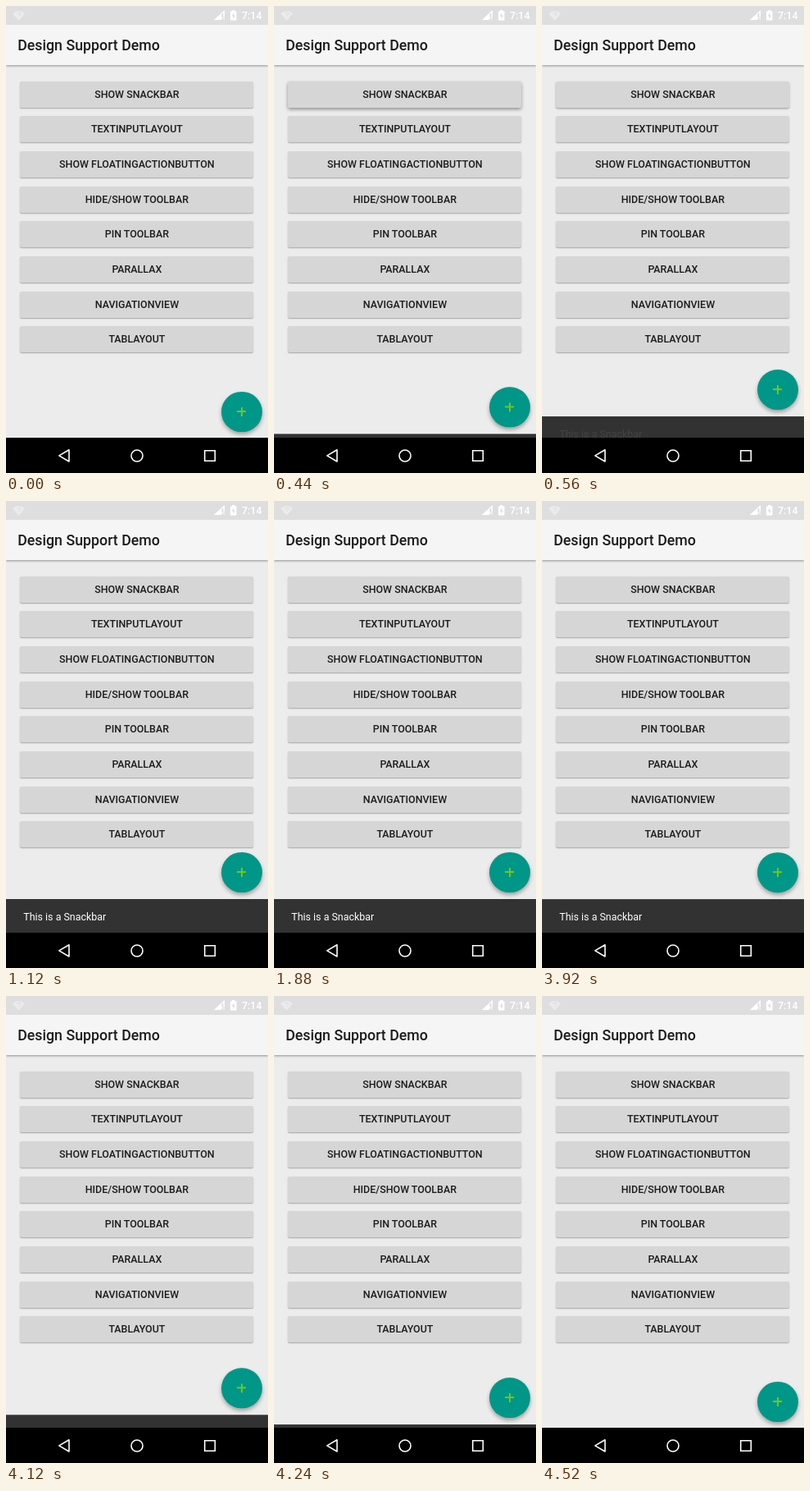
Write an HTML page that moves like this. It is 320 px wide and 569 px high and loops after 5240 ms.

```html
<!DOCTYPE html>
<html lang="en">
<head>
<meta charset="utf-8">
<title>Design Support Demo</title>
<style>
html, body { margin: 0; width: 100%; height: 100%; overflow: hidden; }
body { position: relative; background: #ececec; font: 500 12.44px Roboto, sans-serif; color: #1c1c1c; }
body > * { position: absolute; box-sizing: border-box; }
#status { left: 0; top: 0; width: 320px; height: 23px; background: #dedede; }
#clock { left: 288px; top: 0; line-height: 23px; color: #fff; }
#bar { left: 0; top: 23px; width: 320px; height: 49px; padding-left: 14.2px; background: #f5f5f5;
  box-shadow: 0 1px 2.5px rgba(0,0,0,.4); clip-path: inset(0 0 -8px 0); font-size: 17.78px; line-height: 50px; }
.btn { left: 17.3px; width: 285.2px; height: 32.2px; border-radius: 2px; background: #d6d6d6;
  text-align: center; line-height: 32.4px; box-shadow: 0 1px 1.5px rgba(0,0,0,.3); }
#fab { left: 263.1px; top: 469.5px; width: 49.8px; height: 49.8px; border-radius: 50%; background: #009688;
  box-shadow: 0 3px 5px rgba(0,0,0,.32); }
#fab::before, #fab::after { content: ""; position: absolute; background: #74c80c; }
#fab::before { left: 19.4px; top: 23.9px; width: 11px; height: 2px; }
#fab::after { left: 23.9px; top: 19.4px; width: 2px; height: 11px; }
#snack { left: 0; top: 484.5px; width: 320px; height: 42px; padding-left: 21.3px; background: #323232;
  color: #fff; font-weight: 400; line-height: 43px; }
#nav { left: 0; top: 526.4px; width: 320px; height: 43px; background: #000; }
svg { left: 0; top: 0; }
</style>
</head>
<body>
<div id="status"></div>
<div id="bar">Design Support Demo</div>
<div id="fab"></div>
<div id="snack"><span id="msg">This is a Snackbar</span></div>
<div id="nav"></div>
<div id="clock">7:14</div>
<svg width="320" height="569" fill="none">
  <path d="M8 9Q15.5 3 23 9L15.5 18Z" fill="#ebebeb"/>
  <path d="M14 10q0-2 1.8-2t1.8 1.8q0 1-1.8 2.2v1" stroke="#dedede"/>
  <path d="M254 17L267 5V17Z" fill="#f0f0f0"/>
  <path d="M262 17L267 12.4V5L254 17Z" fill="#fff"/>
  <path d="M264.5 9V14M264.5 15V17" stroke="#dedede" stroke-width="2"/>
  <path d="M274 6.5H276V5H279.5V6.5H281.5V17.5H274Z" fill="#fff"/>
  <path d="M278.5 8L275.7 12.6H277.5V16L280 11.4H278.3Z" fill="#dedede"/>
  <g stroke="#fff" stroke-width="1.6">
    <path d="M77 540.8V555L64.8 547.9Z" stroke-linejoin="round"/>
    <circle cx="160" cy="548" r="7"/>
    <path d="M242.7 541.7H255.3V554.3H242.7Z"/>
  </g>
</svg>
<script>
const LOOP = 5240, SLIDE = 560, SHOW = 328, HIDE = 3899, TRAVEL = 42;
const $ = id => document.getElementById(id);
const fab = $('fab'), snack = $('snack'), msg = $('msg');

const buttons = ['SHOW SNACKBAR', 'TEXTINPUTLAYOUT', 'SHOW FLOATINGACTIONBUTTON', 'HIDE/SHOW TOOLBAR',
  'PIN TOOLBAR', 'PARALLAX', 'NAVIGATIONVIEW', 'TABLAYOUT'].map((label, i) => {
  const el = document.createElement('div');
  el.className = 'btn';
  el.textContent = label;
  el.style.top = 91.6 + i * 42.67 + 'px';
  document.body.insertBefore(el, fab);
  return el;
});

const ramp = (t, start, length) => Math.min(1, Math.max(0, (t - start) / length));
const smooth = x => (1 - Math.cos(Math.PI * x)) / 2;

// cubic-bezier(.4, 0, .2, 1), solved by bisection
function ease(x) {
  let lo = 0, hi = 1;
  for (let i = 0; i < 24; i++) {
    const s = (lo + hi) / 2, r = 1 - s;
    if (1.2 * s * r * r + .6 * s * s * r + s ** 3 < x) lo = s; else hi = s;
  }
  return x <= 0 ? 0 : x >= 1 ? 1 : lo * lo * (3 - 2 * lo);
}

function draw(t) {
  const up = ease(ramp(t, SHOW, SLIDE)) - ease(ramp(t, HIDE, SLIDE));
  fab.style.transform = `translateY(${-TRAVEL * up}px)`;
  snack.style.transform = `translateY(${TRAVEL * (1 - up)}px)`;
  msg.style.opacity = smooth(ramp(t, SHOW + .28 * SLIDE, .72 * SLIDE)) - smooth(ramp(t, HIDE, .72 * SLIDE));

  const press = smooth(ramp(t, 80, 200)) - smooth(ramp(t, 440, 200));
  buttons[0].style.boxShadow = `0 ${1 + press}px ${1.5 + 2.5 * press}px rgba(0,0,0,${.3 + .1 * press})`;
}

let start;
function tick(now) {
  start ??= now;
  draw((now - start) % LOOP);
  requestAnimationFrame(tick);
}
draw(0);
requestAnimationFrame(tick);
</script>
</body>
</html>
```
